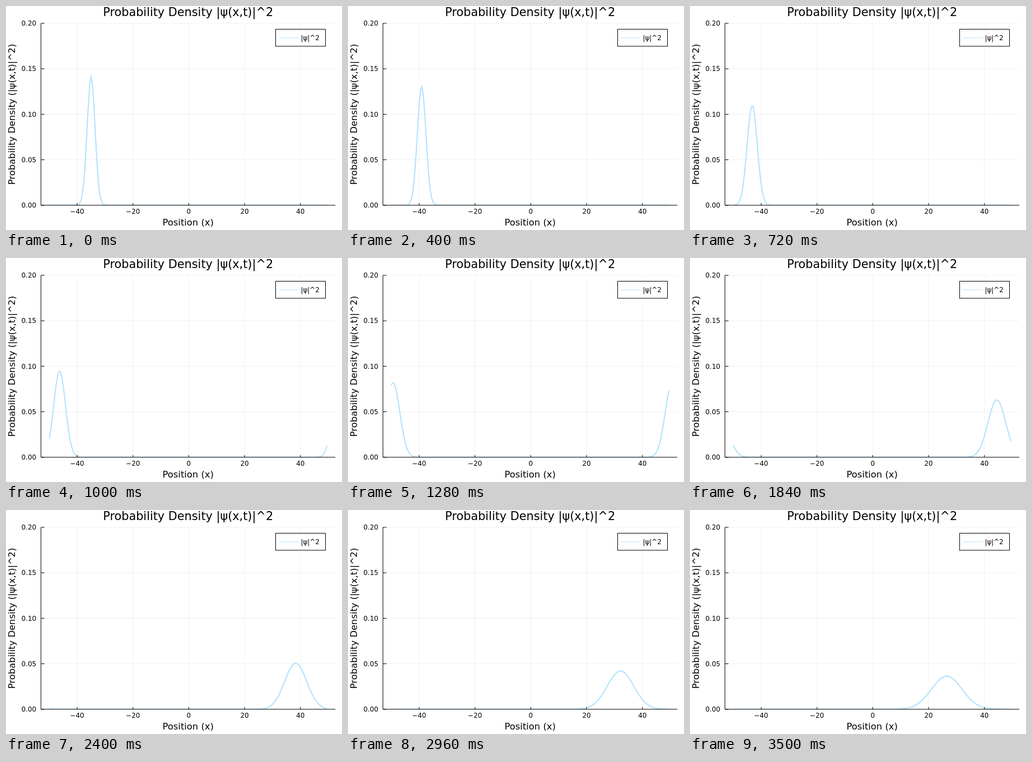
Recreate the animation shown at these times as an HTML page. Size 600 by 400 pixels, loop 3.52 s.

```html
<!DOCTYPE html>
<html lang="en">
<head>
<meta charset="utf-8">
<title>Probability density</title>
<style>
  html, body { margin: 0; width: 100%; height: 100%; overflow: hidden; background: #fff; }
  svg { display: block; font-family: "DejaVu Sans", sans-serif; font-size: 11.88px; }
  .wave { fill: none; stroke: #b0e2ff; stroke-miterlimit: 10; }
  .axis { fill: none; stroke: #000; }
  .grid { fill: none; stroke: #000; stroke-opacity: .1; stroke-width: .6; }
  .mid { text-anchor: middle; }
  .end { text-anchor: end; }
  .label { font-size: 16.35px; }
</style>
</head>
<body>
<svg width="600" height="400" viewBox="0 0 600 400">
  <clipPath id="area"><rect x="62.4" y="30.9" width="525.6" height="325"/></clipPath>
  <path id="grid" class="grid"/>
  <polyline id="curve" class="wave" stroke-width="2" clip-path="url(#area)"/>
  <path id="axes" class="axis"/>
  <g id="ticks"></g>
  <text class="mid" x="325.2" y="18.2" font-size="20.8">Probability Density |ψ(x,t)|^2</text>
  <text class="mid label" x="325.2" y="392">Position (x)</text>
  <text class="mid label" transform="translate(16 193.4) rotate(-90)">Probability Density (|ψ(x,t)|^2)</text>
  <rect x="481.5" y="41.5" width="89" height="30.4" fill="#fff" stroke="#000"/>
  <path class="wave" d="M487.3 56.8H522.3"/>
  <text x="526.4" y="61.3">|ψ|^2</text>
</svg>
<script>
const $ = id => document.getElementById(id);
const LEFT = 62.4, RIGHT = 588, TOP = 30.9, BOTTOM = 355.8;
const px = x => 326.4 + 4.983 * x;
const py = p => BOTTOM - (BOTTOM - TOP) * p / 0.2;

let grid = '', axes = `M${LEFT} ${TOP}V${BOTTOM}H${RIGHT}`, labels = '';
for (let x = -40; x <= 40; x += 20) {
  grid += `M${px(x)} ${TOP}V${BOTTOM}`;
  axes += `M${px(x)} ${BOTTOM}v-3.9`;
  labels += `<text class="mid" x="${px(x)}" y="371.3">${String(x).replace('-', '−')}</text>`;
}
for (let i = 0; i <= 4; i++) {
  const y = py(i * 0.05);
  grid += `M${LEFT} ${y}H${RIGHT}`;
  axes += `M${LEFT} ${y}h6.3`;
  labels += `<text class="end" x="54" y="${y + 4.3}">${(i * 0.05).toFixed(2)}</text>`;
}
$('grid').setAttribute('d', grid);
$('axes').setAttribute('d', axes);
$('ticks').innerHTML = labels;

// Free Gaussian packet on a periodic grid of 200 points.
// Wave number 10 is above the grid limit, so it aliases to 10 - 4π.
const DX = 0.5, SPAN = 100, VELOCITY = 10 - 4 * Math.PI;

function drawPacket(t) {
  const centre = -35 + VELOCITY * t;
  const variance = 2 * (1 + (t / 4) ** 2);
  const peak = DX / Math.sqrt(2 * Math.PI * variance);
  let points = '';
  for (let i = 0; i < 200; i++) {
    const x = -50 + i * DX;
    let d = x - centre;
    d -= SPAN * Math.round(d / SPAN);
    const density = peak * Math.exp(-d * d / (2 * variance));
    points += `${px(x).toFixed(2)},${py(density).toFixed(2)} `;
  }
  $('curve').setAttribute('points', points);
}

// Steps last 20, 100 and 20 ms in turn.
function stepAt(ms) {
  const r = ms % 140;
  return 3 * Math.floor(ms / 140) + (r < 20 ? 0 : r < 120 ? 1 : 2);
}

let start, shown = -1;
function tick(now) {
  start ??= now;
  const step = stepAt(Math.max(0, now - start) % 3520);
  if (step !== shown) drawPacket(0.2 * (shown = step));
  requestAnimationFrame(tick);
}
drawPacket(0);
requestAnimationFrame(tick);
</script>
</body>
</html>
```
